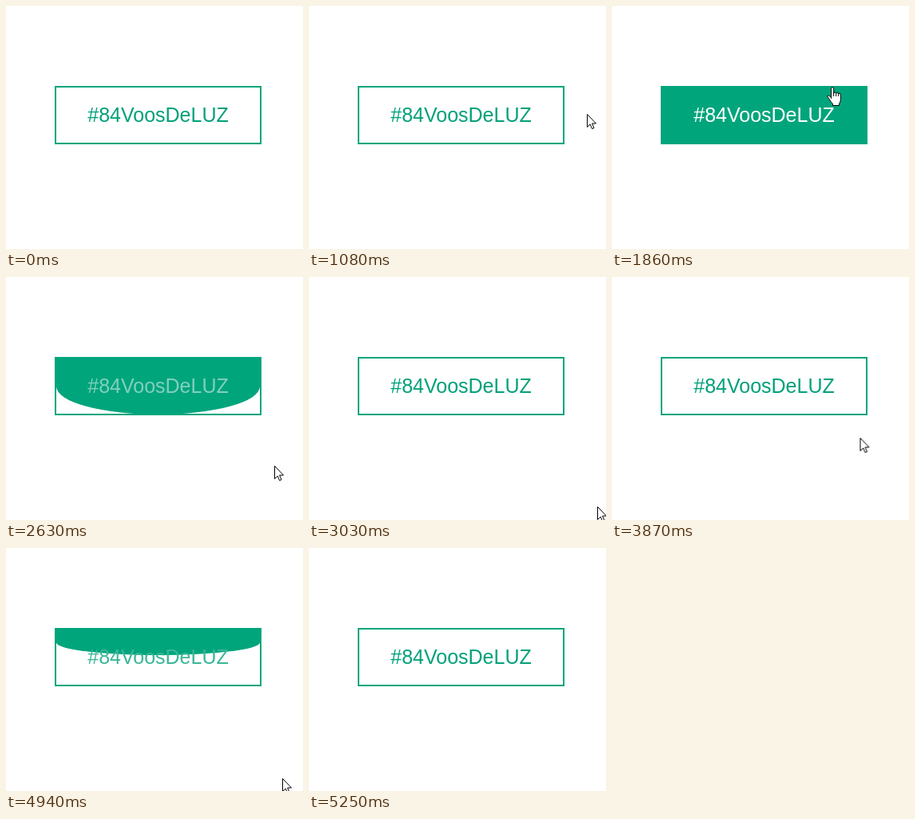
An HTML page for the animation above (5870 ms loop, 372 by 304 pixels).

```html
<!DOCTYPE html>
<html lang="pt">
<head>
<meta charset="utf-8">
<title>Button hover</title>
<style>
  html, body { margin: 0; width: 100%; height: 100%; overflow: hidden; background: #fff; }
  .stage { position: relative; width: 372px; height: 304px; overflow: hidden; }
  .button {
    position: absolute; left: 61px; top: 100px; width: 259px; height: 73px;
    box-sizing: border-box; border: 2px solid #00a57c; overflow: hidden;
    font: 25px/29px "Liberation Sans", Arial, sans-serif; text-align: center;
  }
  .fill {
    position: absolute; left: 0; top: 0; width: 100%; height: 0;
    background: #00a57c; border-radius: 0 0 50% 50%;
  }
  .label { position: absolute; left: 0; right: 0; top: 20px; white-space: nowrap; color: #00a07a; }
  .cursor { position: absolute; left: 0; top: 0; width: 30px; height: 30px; overflow: visible; }
  .cursor path { fill: #fff; stroke: #000; stroke-linejoin: round; }
</style>
</head>
<body>
<div class="stage">
  <div class="button">
    <div class="fill"></div>
    <div class="label">#84VoosDeLUZ</div>
  </div>
  <svg class="cursor">
    <path class="arrow" d="M.5 .5V16.5L4.2 13L6.6 18.6L9 17.6L6.6 12H11.5Z"/>
    <g class="hand" transform="translate(-5 -1)">
      <path d="M5.5 15V2.3a1.6 1.6 0 0 1 3.2 0V8.2q0-1.2 1.4-1.2q1.6 0 1.6 1.5q0-1 1.4-1q1.6 0 1.6 1.6q0-.8 1.2-.8q1.5 0 1.5 1.7V16q0 3-2 5.5v2H7.5v-2Q5 19 2.5 14.5Q.2 12 1.2 11Q2.5 10 5.5 13.5Z"/>
      <path d="M8.7 8v4M11.7 8.5v3.5M14.7 9v3"/>
    </g>
  </svg>
</div>
<script>
const LOOP = 5870;
const FADE = 500;
const HOVERS = [[1340, 2485], [3960, 4705]];

// Screen updates: first time, last time, count
const RUNS = [
  [480, 1020, 8], [1080, 1630, 8], [1710, 1860, 3],
  [2400, 2860, 7], [3030, 3030, 1], [3500, 4040, 8],
  [4100, 4490, 6], [4640, 5170, 8], [5250, 5250, 1]
];

// Pointer path: time, x, y
const PATH = [
  [480, 310, 261], [640, 324, 248], [790, 338, 222], [940, 345, 190],
  [1020, 346, 169], [1080, 348, 135], [1320, 322, 126], [1480, 294, 113],
  [1630, 274, 102], [2330, 274, 102], [2400, 282, 117], [2480, 304, 165],
  [2630, 336, 236], [2860, 361, 287], [3430, 361, 287], [3500, 357, 277],
  [3730, 325, 221], [3890, 296, 181], [3960, 281, 164], [4040, 266, 142],
  [4100, 260, 134], [4570, 260, 134], [4640, 268, 144], [4720, 288, 176],
  [4870, 331, 257], [4940, 346, 288], [5010, 345, 306]
];

const $ = name => document.querySelector("." + name);

const ticks = [0, ...RUNS.flatMap(([from, to, n]) =>
  Array.from({ length: n }, (_, i) =>
    Math.round((from + (to - from) * i / Math.max(1, n - 1)) / 10) * 10))];

function track(el, frames) {
  const anim = el.animate(frames, { duration: LOOP, fill: "both" });
  anim.pause();
  return anim;
}

function hoverFrames(prop, off, on) {
  const key = (time, value, easing = "linear") => ({ offset: time / LOOP, [prop]: value, easing });
  return [
    key(0, off),
    ...HOVERS.flatMap(([enter, leave]) => [
      key(enter, off, "ease"), key(enter + FADE, on),
      key(leave, on, "ease"), key(leave + FADE, off)
    ]),
    key(LOOP, off)
  ];
}

const move = (x, y) => `translate(${x}px, ${y}px)`;
const pathFrames = PATH.map(([time, x, y]) => ({ offset: time / LOOP, transform: move(x, y) }));
const away = offset => ({ offset, transform: move(345, 310) });

const tracks = [
  track($("fill"), hoverFrames("height", "0%", "200%")),
  track($("label"), hoverFrames("color", "#00a07a", "#fff")),
  track($("cursor"), [away(0), away(PATH[0][0] / LOOP), ...pathFrames, away(1)])
];

function draw(time) {
  const now = ticks.findLast(tick => tick <= time);
  const hover = HOVERS.some(([enter, leave]) => now >= enter && now < leave);
  tracks.forEach(anim => { anim.currentTime = now; });
  $("arrow").style.display = hover ? "none" : "";
  $("hand").style.display = hover ? "" : "none";
}

const start = performance.now();
function loop() {
  draw((performance.now() - start) % LOOP);
  requestAnimationFrame(loop);
}
loop();
</script>
</body>
</html>
```
